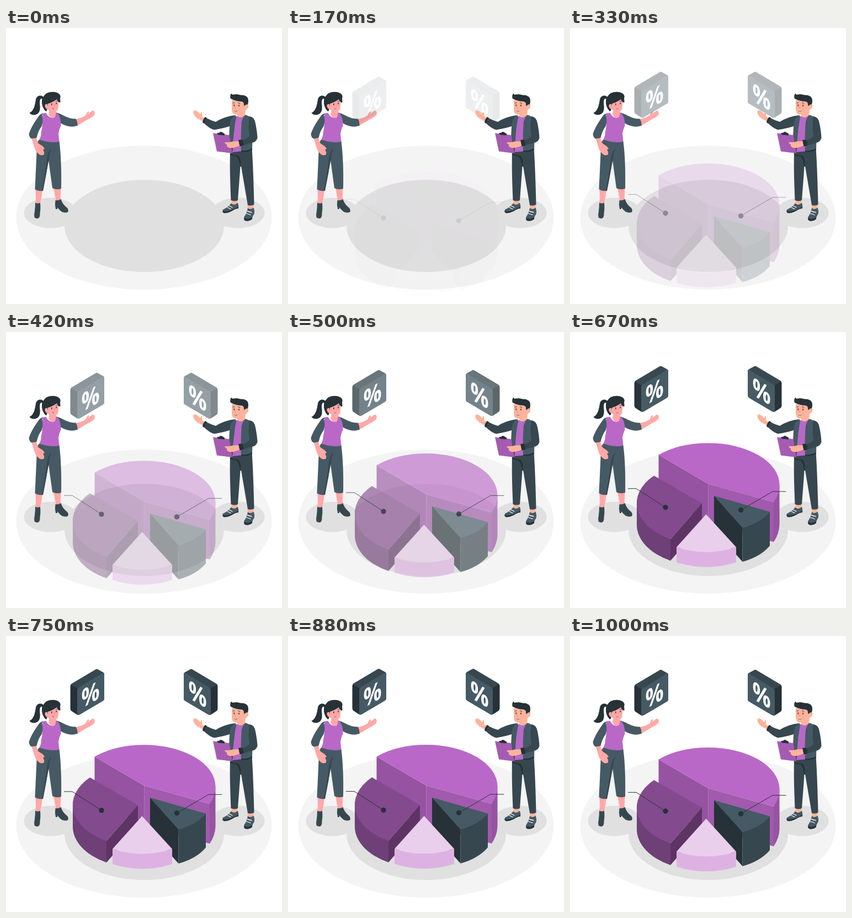
These frames come from a looping animation (500 by 500 pixels, 1.04 s). An HTML page with a canvas:

```html
<!DOCTYPE html>
<html lang="en">
<head>
<meta charset="utf-8">
<title>Pie chart presentation</title>
<style>
html, body { margin: 0; width: 100%; height: 100%; overflow: hidden; background: #fff; }
canvas { display: block; width: 500px; height: 500px; }
</style>
</head>
<body>
<canvas id="stage"></canvas>
<script>
const SIZE = 500, LOOP = 1040, FPS = 24;
const dpr = Math.max(1, window.devicePixelRatio || 1);
const ink = '#263238', slate = '#37474f', steel = '#455a64';
const violet = '#b968c7', pink = '#ffa8a7', peach = '#fdb49c';

function prepare(c) {
  c.width = c.height = SIZE * dpr;
  const g = c.getContext('2d');
  g.scale(dpr, dpr);
  return g;
}
const ctx = prepare(document.getElementById('stage'));
const layer = prepare(document.createElement('canvas'));

// Each part is [colour, path] for a fill, or [colour, path, width] for a line.
const parts = list => list.map(([color, d, width]) => ({ color, path: new Path2D(d), width }));

function paint(g, list) {
  g.lineCap = g.lineJoin = 'round';
  for (const { color, path, width } of list) {
    if (width) {
      g.strokeStyle = color;
      g.lineWidth = width;
      g.stroke(path);
    } else {
      g.fillStyle = color;
      g.fill(path);
    }
  }
}

function ellipse(g, color, x, y, rx, ry) {
  g.fillStyle = color;
  g.beginPath();
  g.ellipse(x, y, rx, ry, 0, 0, Math.PI * 2);
  g.fill();
}

// Draws into a shared layer and blends it as one group.
function group(dy, alpha, draw) {
  if (alpha <= 0) return;
  layer.clearRect(0, 0, SIZE, SIZE);
  layer.save();
  layer.translate(0, dy);
  draw(layer);
  layer.restore();
  ctx.globalAlpha = Math.min(1, alpha);
  ctx.drawImage(layer.canvas, 0, 0, SIZE, SIZE);
  ctx.globalAlpha = 1;
}

function bezier(x1, y1, x2, y2) {
  const at = (a, b, t) => 3 * (1 - t) * (1 - t) * t * a + 3 * (1 - t) * t * t * b + t * t * t;
  return x => {
    if (x <= 0) return 0;
    if (x >= 1) return 1;
    let lo = 0, hi = 1;
    for (let i = 0; i < 30; i++) {
      const mid = (lo + hi) / 2;
      if (at(x1, x2, mid) < x) lo = mid; else hi = mid;
    }
    return at(y1, y2, lo);
  };
}
const riseCard = bezier(.36, -.01, .5, 1.38);
const risePie = bezier(.46, -.15, .47, 1.5);

const woman = parts([
  // ponytail
  [ink, 'M70 128C67 121 56 120 54 130C52 141 51 149 42.500 154C46 158.500 55 159 59.500 153C64 146 60 138 61.500 131Q63 125 68 131Z'],
  // shins and boots
  [pink, 'M53 291L66 293Q65 306 61.500 319L53 319Q55 306 53 291Z'],
  [pink, 'M86 289L99.500 289L98.500 314L90.500 314Z'],
  [slate, 'M53 316.500Q58 319 62 316.500Q63 328 61.500 335Q62 342 59 344.500Q54 346 51.500 343Q50.500 338 52 332Q53 324 53 316.500Z'],
  [slate, 'M89.500 312Q95 313 99.500 310Q102 319 111 326Q114 330 112 333.500Q107 335.500 101 333Q96 329 93 325V328H90Q88 320 89.500 312Z'],
  // trousers
  [steel, 'M61 202Q56 204 56 216L52.500 292Q58 296 67 295L77 239L84 290Q91 294 100 291Q101 240 96.500 205Z'],
  [slate, 'M86 216Q79 219 77.500 239Q72 270 67 295L65 295Q71 261 74 239Q75 222 86 216Z'],
  // right arm
  [pink, 'M126 165Q139 163 144.500 158Q147 151 150 151Q151 153 149.500 156Q154 150.500 158 149.500Q161.500 151 160.500 157Q155 163 149 165L129 177Z'],
  [steel, 'M90 153Q96 154 105 159Q117 165 126.500 164.500Q130 170 129.500 177Q121 180 113 178Q102 175 95 170Z'],
  // neck and top
  [pink, 'M79 146H91V155L92 163Q84 168 77 157Z'],
  [violet, 'M67 155L72 153.500Q78 164 87 163Q91 160 90 153.500L94 155Q100 164 99.500 177Q96 184 95 191L96.500 206Q78 209 60.500 202Q64 195 63.500 190Q68 173 63.500 165Z'],
  // left arm with the hand on the hip
  [pink, 'M46 198L55 197Q56 207 60 210Q68 214 70 219L67 220Q70 225 69 229Q65 232 60 229Q54 224 52 218Z'],
  [steel, 'M68 154.500Q61 155 57 163Q45 180 41.500 192Q42 198 46 200.500L55.500 199Q58 187 64.500 178Q68 168 65 158Z'],
  // head
  [pink, 'M73 130Q76 121 86 121Q95 123 95.500 134L94.500 146Q93 152 87 151Q75 151 73 143Z'],
  [ink, 'M72 151Q64 143 65 131Q68 119 78 116.500Q89 114 96 119Q100 123 98 127Q98.500 131 98.500 135Q94 135 92 129Q84 135 76 137L74 150Z'],
  [pink, 'M75 138Q70 137 70.500 142Q72 147 76 147Z'],
  [ink, 'M82.800 137.200V139.200M91.200 135.800V137.600', 1.5],
  [ink, 'M80.500 134L84 133M90 133L92.500 132.500', .8],
  [ink, 'M84 146Q85.500 147 87 146.300', .6],
  ['#f27f88', 'M87.500 137Q89.500 141 87.300 141.300', .8]
]);

const man = parts([
  // raised hand
  [peach, 'M360 163L355 160Q356 153 354 152Q352 154 352 156Q346 149 341 149Q338.500 151 340 156Q344 164 357 169Z'],
  [slate, 'M415 158Q396 160 380 170Q370 167 361 162Q356 166 357 171Q368 182 377 184.500Q394 182 408 177Z'],
  [ink, 'M361 161L364 163Q360 167 359 173L356 171Q357 165 361 161Z'],
  // ankles and shoes
  [peach, 'M409 308H420L418 321L408 320Z'],
  [peach, 'M438 318H449L448 330L438 329Z'],
  [steel, 'M408 317.500Q414 323 419.500 316.500Q422 321 421 326Q416 327 410 331Q402 336 394 335Q391 333 393 329Q402 325 408 317.500Z'],
  [ink, 'M392.500 331.500Q402 334 410 329L421 324V327Q416 327 410 331Q402 336 394 335Z'],
  [steel, 'M438 326Q443 330 448.500 325.500Q451 332 449.500 337Q446 342 446 346Q440 351 433 349Q430 347 431.500 342Q436 336 438 326Z'],
  [ink, 'M431.500 344Q438 348 446 343V346Q440 351 433 349Q430.500 347 431.500 344Z'],
  ['#fff', 'M404 322L410 325M401 325L407 328M437 332L445 334M435.500 336L443 338.500', 1.3],
  // trousers
  [slate, 'M406 222L445.500 217Q448 255 449.500 320Q444 323 438 321L425 245L420 312Q414 315 407.500 312Q405 260 406 222Z'],
  [ink, 'M406 227Q413 231 421 231Q426 236 426 251L424 251Q422 237 418 233L406 230Z'],
  // shirt and jacket
  [violet, 'M414 160L433 159L430 223L410 225Z'],
  [steel, 'M416 158Q408 161 406 170Q403 192 405 222L411 223Q412 185 417 162Z'],
  [steel, 'M432 157Q443 159 447 167L446 220Q437 225 426 224Q425 189 427 169Z'],
  [ink, 'M426 222Q437 223 446 218V220.500Q437 226 426 224Z'],
  [peach, 'M418 148H434L433 158Q426 165 419 160Z'],
  // clipboard
  ['#a65bb3', 'M375 190.500L404.500 194L410 227L382 223.500Z'],
  [ink, 'M382 190L386 190Q388 187 391 188.500L396 191.500L396 194.500L384 193.500Z'],
  [peach, 'M424 205L411 205.500Q407 207 397 207Q395 209 400 211Q399 215 404 217Q413 218 424 213Z'],
  // holding arm
  [slate, 'M441 160Q450 161 452 173Q455 188 455.500 199Q454 206 446 208L425 214Q421 208 423 204Q432 204 441 196Q438 176 441 160Z'],
  [ink, 'M421 203L427.500 202Q431 207 429.500 213L423.500 214.500Z'],
  // head
  [peach, 'M409 131Q418 125 432 132L433 148Q431 156 420 157Q410 158 409 149Z'],
  [ink, 'M407 128Q405 123 408 118.500Q410 121.500 412 120.500Q419 119 425 121.500Q435 121 438 127Q440 131 438 139L434 144L431 140Q432 134 426 133Q417 133 407 128Z'],
  [peach, 'M432 141Q437 136 439.500 140Q440 146 433 149Z'],
  [ink, 'M413.200 139V141M422 139.500V141.500', 1.5],
  [ink, 'M411 136L414 135.500M420.500 135.500L424 137', .9],
  [ink, 'M414.500 151Q416.500 152 419 150.500', .6],
  ['#ed8976', 'M415.500 140Q413.500 145 416 146M422 148H422.800', .9]
]);

const pie = parts([
  // back slice
  ['#a15aad', 'M250.500 276L369 309V381L250.500 348Z'],
  ['#9653a1', 'M160.500 223.400L250.500 276V348L160.500 296Z'],
  ['#9653a1', 'M379.500 277.500V350Q379 366 369 381V307.500Z'],
  [violet, 'M250.500 276L160.500 223.400A129 75.500 0 0 1 250.500 202A129 75.500 0 0 1 379.500 277.500Q379.500 294 369 309Z'],
  // left slice
  ['#5d3464', 'M182 376L239 311V350L182 415Z'],
  ['#6f3f78', 'M121 308V350A118 74 0 0 0 182 415V376Z'],
  ['#834a8d', 'M239 311L152 261A118 74 0 0 0 182 376Z'],
  // dark slice
  [ink, 'M261 297.500L312.500 355V417L261 359Z'],
  [slate, 'M312.500 355Q345 346 362 326.500V388Q345 408 312.500 417Z'],
  [steel, 'M261 297.500L362 326.500Q345 346 312.500 355Z'],
  // light slice
  ['#ddb2e2', 'M193 390.500Q247 408 301 390.500V418Q247 435 193 418Z'],
  ['#e9cfec', 'M246.500 331L301 390.500Q247 408 193 390.500Z']
]);

const box = parts([
  [ink, 'M116.500 93Q116.500 90 119 88.500L162 63Q164 61.300 166 62.500L176 68Q178 69 178 71.500V115Q178 118 175.500 119.500L134 144Q131 146 128 144L118 137.500Q116.500 136 116.500 133Z'],
  [slate, 'M117.500 90Q118 89 119 88.500L162 63Q164 61.300 166 62.500L177 68.500L130 97Z'],
  [steel, 'M129 100Q129 97 131.500 95.500L174.500 69.500Q178 68 178 71.500V115Q178 118 175.500 119.500L134 144Q129 146.500 129 142Z']
]);

function card(g, mirrored) {
  g.save();
  if (mirrored) {
    g.translate(SIZE, 0);
    g.scale(-1, 1);
  }
  paint(g, box);
  g.restore();
  g.save();
  // the sign lies in the slanted plane of the card face
  g.transform(.8, mirrored ? .46 : -.46, 0, 1, mirrored ? 347 : 153, 107.5);
  g.font = '700 46px "Open Sans", "Noto Sans", sans-serif';
  g.textAlign = 'center';
  g.fillStyle = '#fff';
  g.fillText('%', 0, 16.5);
  g.restore();
}

const leads = parts([
  [ink, 'M105.500 284H120L173 318M391 289.300H367L309.500 322.800', 1]
]);

function labels(g) {
  paint(g, leads);
  ellipse(g, ink, 173, 318, 4.7, 4.7);
  ellipse(g, ink, 309.5, 322.8, 4.7, 4.7);
}

function floor() {
  ellipse(ctx, '#f4f4f4', 250, 343.5, 231.5, 130.5);
  for (const x of [80.5, 420.5]) ellipse(ctx, '#e0e0e0', x, 335, 48, 27.5);
  ellipse(ctx, '#e0e0e0', 250.5, 358.5, 144.5, 83.5);
}

// Steps at 24 per second, with start times rounded to 10 ms.
function progress(ms) {
  const start = i => Math.round(i * 100 / FPS) * 10;
  let i = Math.floor(ms * FPS / 1000) + 1;
  while (start(i) > ms) i--;
  return Math.min(1, i / FPS);
}

function render(ms) {
  const p = progress(ms);
  const lift = riseCard(p), swell = risePie(p);
  const dy = 30 * (1 - lift) - .7;
  ctx.fillStyle = '#fff';
  ctx.fillRect(0, 0, SIZE, SIZE);
  floor();
  group(60 * (1 - swell), Math.pow(Math.max(0, swell), 1.3), g => paint(g, pie));
  group(dy, lift, g => card(g, true));
  paint(ctx, woman);
  paint(ctx, man);
  group(dy, lift, g => card(g, false));
  group(dy, lift, labels);
}

const t0 = performance.now();
function tick() {
  render((performance.now() - t0) % LOOP);
  requestAnimationFrame(tick);
}
tick();
</script>
</body>
</html>
```
